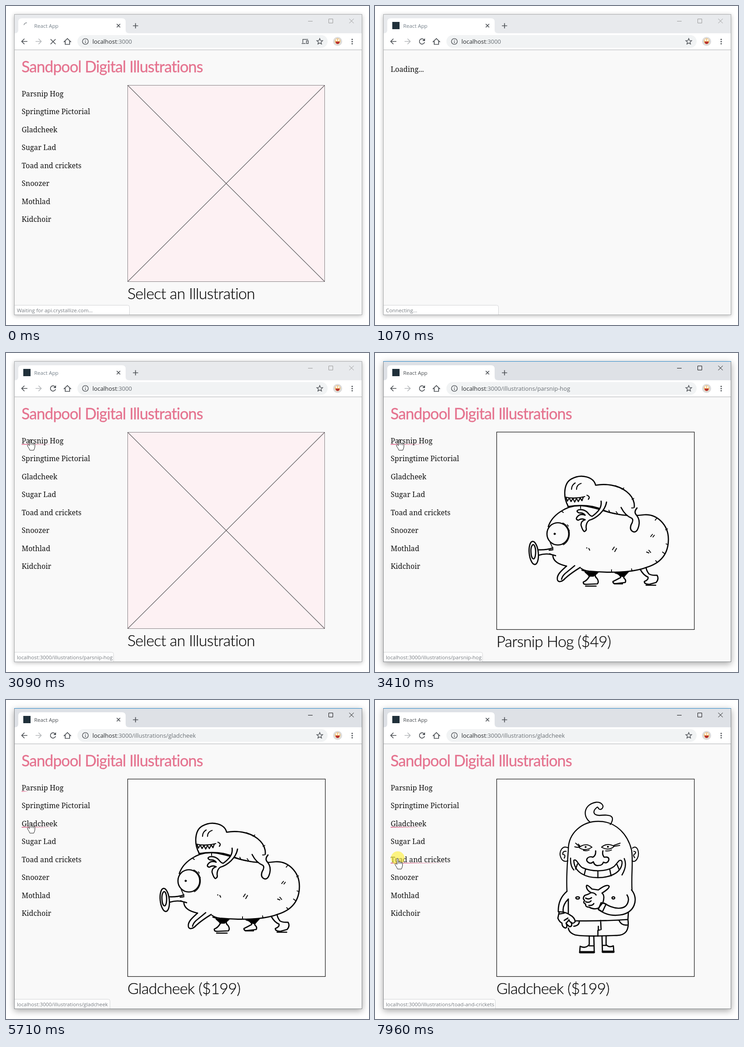
Write an HTML page that moves like this. It is 798 by 702 pixels and loops after 8 s.

```html
<!DOCTYPE html>
<html lang="en">
<head>
<meta charset="utf-8">
<title>Illustration shop</title>
<style>
html, body { margin: 0; width: 100%; height: 100%; overflow: hidden; background: #fff; }
#win { position: absolute; left: 18px; top: 18px; width: 765px; height: 662px; box-shadow: 0 2px 9px rgba(0,0,0,.27); }
#win.on { box-shadow: 0 4px 14px rgba(0,0,0,.36); }
svg { position: absolute; left: 0; top: 0; display: block; }
.ui { font-family: "Open Sans", "Noto Sans", sans-serif; }
.nav { font: 15.76px "Noto Serif", serif; fill: #111; }
.big { font-family: Lato, "Open Sans", sans-serif; font-size: 34px; }
.line { fill: none; stroke: #4d5156; stroke-width: 1.7; }
.ink { fill: none; stroke: #050505; stroke-width: 2.7; stroke-linecap: round; stroke-linejoin: round; }
</style>
</head>
<body>
<div id="win"></div>
<svg width="798" height="702" viewBox="0 0 798 702">
  <defs>
    <linearGradient id="fade"><stop stop-color="#db5f85"/><stop offset="1" stop-color="#db5f85" stop-opacity="0"/></linearGradient>
  </defs>
  <rect x="18" y="18" width="765" height="662" fill="#f9f9f9"/>
  <rect id="bar" x="18" y="18" width="765" height="42" fill="#e8eaed"/>
  <path d="M19 60C25 60 27 57 27 52V35Q27 27 35 27H255Q263 27 263 35V52C263 57 265 60 271 60Z" fill="#fff"/>
  <rect x="18" y="60" width="765" height="36" fill="#fff"/>
  <path d="M18 96.5H783" stroke="#b0b2b4"/>

  <path id="spin" class="line" d="M39.4 42A6 6 0 0 1 46 37" style="stroke:#8d9297;stroke-width:1.5"/>
  <rect id="fav" x="38" y="35" width="16" height="16" fill="#20303a"/>
  <path class="line" d="M243.5 39.5l7.5 7.5m0-7.5l-7.5 7.5M279 43.5h11.5M284.7 37.7v11.5"/>
  <g id="ctl" fill="none" stroke="#999">
    <path d="M664 33.5h10M709.5 28.5h9v9h-9zM754.5 28l10 10m0-10l-10 10"/>
  </g>

  <path class="line" d="M47 78H35M40.5 72L34.5 78L40.5 84"/>
  <path class="line" d="M65 78H77M71.5 72L77.5 78L71.5 84" style="stroke:#b6b9bc"/>
  <path id="stop" class="line" d="M98 73l11 11m0-11l-11 11"/>
  <g id="reload">
    <path class="line" d="M108 74.5A5.8 5.8 0 1 0 109 79.5"/>
    <path d="M110 71v6h-6z" fill="#4d5156"/>
  </g>
  <path class="line" d="M128 78.3L135 71.6L142 78.3H139.8V84.5H130.2V78.3Z"/>
  <rect x="157" y="64" width="550" height="28" rx="14" fill="#f1f3f4"/>
  <g class="ui">
    <text id="tab" x="62" y="47.5" font-size="11.4">React App</text>
    <text x="190" y="82.5" font-size="12.9" fill="#26292c">localhost<tspan fill="#6b7176">:3000</tspan><tspan id="path" fill="#6b7176"></tspan></text>
  </g>
  <g class="line" style="stroke-width:1.4">
    <circle cx="174.5" cy="78" r="6.4"/><path d="M174.5 77.5v4M174.5 74.5v1.5"/>
    <path d="M689.7 71.6l1.8 4.3 4.7.4-3.6 3 1.1 4.5-4-2.4-4 2.4 1.1-4.5-3.600-3 4.700-.4z"/>
    <path id="dev" d="M664 73.5H652.5V81M650 82.5H658.5M660.5 76.5H664.5V82.5H660.5Z"/>
  </g>
  <circle cx="729" cy="78" r="10" fill="#dddcdb"/>
  <circle cx="729" cy="77.5" r="6.3" fill="#f2c27b"/>
  <circle cx="726.5" cy="75" r="1.9" fill="#fff"/><circle cx="731.5" cy="75" r="1.9" fill="#fff"/>
  <path d="M724.5 78.5h9q-1 5-4.5 5t-4.5-5z" fill="#b3272d"/>
  <g fill="#4d5156"><circle cx="761" cy="73.5" r="1.5"/><circle cx="761" cy="78.2" r="1.5"/><circle cx="761" cy="83" r="1.5"/></g>

  <text id="load" class="nav" x="34.5" y="145">Loading...</text>
  <g id="page">
    <text class="big" x="34" y="146" fill="#e5738f" stroke="#e5738f" stroke-width=".35" letter-spacing="-.92">Sandpool Digital Illustrations</text>
    <g id="nav"></g>
    <g id="wire" stroke="#5d5a5d">
      <rect x="267.5" y="174.5" width="433" height="432" fill="#fdf1f3" stroke="#858084"/>
      <path d="M267.5 174.5L700.5 606.5M700.5 174.5L267.5 606.5" stroke-width="1.2"/>
    </g>
    <rect id="frame" x="267.5" y="174" width="434.5" height="434.5" fill="#fbfbfb" stroke="#111" stroke-width="1.2"/>

    <g id="pig" class="ink">
      <path d="M381 382C389 357 420 335 452 336C478 337 500 348 530 354C555 358 570 359 592 356C620 354 645 378 645 410C645 440 630 462 596 472C565 484 510 484 470 480C462 479 457 477 453 474M421 469C405 465 393 460 391 447"/>
      <ellipse cx="402" cy="398" rx="24" ry="24.5" fill="#fbfbfb"/>
      <path d="M413 374C432 383 432 412 414 422M385 417Q389 425 391 431M423 378l2 3M427 390v2" stroke-width="1.8"/>
      <circle cx="395" cy="398" r="2" fill="#000" stroke-width="1"/>
      <ellipse cx="349" cy="440" rx="10" ry="25.5" transform="rotate(-6 349 440)" fill="#fbfbfb"/>
      <path d="M345 424C350 416 354 430 353 442C352 458 344 456 343 440C342 432 344 426 345 424"/>
      <path d="M359 433Q376 434 391 429M360 445Q378 439 397 446M383 434l8-1M384 442l8 3"/>
      <path d="M421 469C409 480 399 488 401 499C403 506 412 503 418 496Q430 485 451 472M439 468L422 482Q412 489 410 498"/>
      <path d="M455 478Q468 480 471 492Q466 501 458 504Q457 510 466 509L489 508Q493 503 488 496Q480 490 489 483M528 484Q540 487 540 494Q531 499 523 503Q523 509 533 507L550 505Q553 500 547 495Q546 490 556 482"/>
      <path d="M462 482L490 483L480 491L472 491ZM532 483L557 481L547 492L540 491Z" fill="#000"/>
      <path d="M583 476Q590 489 600 493Q602 499 592 503Q592 509 603 509L618 505Q625 497 620 489Q608 490 602 486Q597 479 596 473M596 511h21M463 513h23M526 508h18"/>
      <path d="M470 430l2 4M465 429h1M522 433l4-6M527 437l4-7M597 438l5 2M602 434l4 5M606 404l4-5M611 405l3-4M639 389l4-2M640 420l4 2M632 438l4 3M617 457l4 4M410 348l4 3M452 342v-5M520 482v-5M565 480l-1-5M616 368l3-4" stroke-width="1.9"/>
      <path fill="#fbfbfb" d="M424 336C413 315 415 286 432 277C454 265 481 273 485 291C505 287 535 290 553 305C571 319 576 341 562 355Q554 360 526 353Q510 350 500 345Q470 331 424 338"/>
      <path d="M418 317Q439 322 461 316M420 318l3 8 4-7 4 8 4-7 4 8 4-8 4 7 4-8 4 6 3-8M466 313Q474 316 469 322M432 300Q432 291 440 286M443 300Q443 290 453 287" stroke-width="2.3"/>
      <path fill="#fbfbfb" d="M497 326C499 341 490 350 478 359Q474 360 468 352Q460 343 448 345Q440 348 449 352Q458 351 462 357Q452 353 446 359Q439 366 447 368Q454 363 462 367Q452 370 453 379Q456 390 460 393Q466 391 464 384Q464 373 471 368C486 364 506 348 509 328"/>
      <path fill="#fbfbfb" d="M541 340Q550 358 565 364Q569 368 563 378Q559 389 567 393Q576 397 580 380Q583 367 575 357Q568 350 576 341"/>
      <path d="M514 346l2 4M530 349l3 4M529 292l4 3M543 300l4-3M565 322l4-2M568 341h-4" stroke-width="1.8"/>
    </g>

    <g id="man" class="ink">
      <path d="M473 269C454 254 461 229 486 225C498 224 506 234 498 240C489 244 492 232 487 237C479 244 478 253 493 254C512 252 526 253 521 267Q520 271 517 274" stroke-width="2.3"/>
      <path d="M422 421C420 385 423 361 425 329C425 292 456 267 491 267C532 267 556 298 564 330C568 354 563 383 565 419" stroke-width="2.4"/>
      <path d="M424 325C411 319 404 335 408 345Q412 358 424 354M420 333Q412 332 413 340Q420 340 416 348M566 326C576 317 583 336 577 348Q572 358 565 354M569 333Q576 334 571 339Q566 341 571 347" stroke-width="2.1"/>
      <path d="M439 323Q448 326 454 321Q466 315 477 324Q461 334 449 325M441 315l9 8M447 317l4 5M498 324Q510 313 526 322Q514 333 498 324M526 322l12-2M525 320l14-5M458 331q8 2 13-1M507 332q8 1 13-2" stroke-width="2"/>
      <circle cx="463" cy="323.5" r="1.7" fill="#000" stroke-width="1"/><circle cx="512" cy="323" r="1.7" fill="#000" stroke-width="1"/>
      <path d="M485 332Q486 342 479 346C468 342 460 353 470 358Q475 361 480 356Q483 366 492 364Q500 364 502 357Q511 361 514 352Q515 344 504 346Q499 341 501 332"/>
      <path d="M437 353C443 348 447 364 456 369C479 379 510 378 526 366Q533 358 536 354Q544 350 543 360C540 384 510 391 490 391C462 391 438 379 437 353ZM445 361l-4 11M463 372l-3 13M490 376v15M516 372l3 15M532 362l5 12M430 348Q429 365 437 374M548 349Q555 365 543 385" stroke-width="2.5"/>
      <ellipse cx="445.5" cy="435.5" rx="4" ry="2.5"/><ellipse cx="524" cy="435.500" rx="3" ry="2.5"/>
      <path d="M422 421Q402 438 403 466M425 438Q411 452 414 467M425 438V469M564 418C581 438 570 470 539 473Q512 477 491 461M504 447C520 459 553 467 557 441Q558 435 554 429M557 468L556 483"/>
      <path fill="#fbfbfb" d="M491 418L477 416Q463 402 465 412Q466 419 475 424Q469 428 461 430Q455 437 461 441Q456 446 463 449Q462 456 471 456Q481 462 491 458L501 446Q506 430 499 425Q518 413 514 409Q508 405 491 418Z"/>
      <path d="M463 436q8 4 13-1M463 444q8 3 12-2M470 452q8 1 11-4M475 424q8 0 11 5M491 461l6-15 11 3-8 17z"/>
      <path fill="#fbfbfb" d="M405 466Q418 466 427 472Q440 479 440 488Q435 494 431 489Q435 498 428 499Q423 496 420 491Q424 500 419 502Q411 500 411 491Q405 488 402 480Z"/>
      <path d="M405 471l11-2M416 485l8-5M421 490l6-6M430 489l-5-5"/>
      <path d="M440 486Q500 487 556 483Q561 519 530 518Q460 521 440 517Q426 512 425 502M496 485L497 505L490 507V520M491 498v8M437 498Q449 496 449 488M537 486Q542 497 556 495"/>
      <path d="M471 519V538Q463 548 451 542L450 555L482 555L481 519M499 519L500 555H525L524 541Q514 546 508 538V519M471 541h10M500 540h8"/>
      <path d="M451 555H481M501 554H524" stroke-width="5"/>
    </g>
    <text id="cap" class="big" x="267" font-weight="300" fill="#050505" stroke="#050505" stroke-width=".25" letter-spacing="-.7"></text>
  </g>

  <g id="status" class="ui">
    <path id="pill" fill="#fff" stroke="#d3d4d6"/>
    <text id="msg" x="24" y="673.5" font-size="11.35" fill="#777c81"></text>
  </g>
  <rect id="edge" x="18.5" y="18.5" width="764" height="661" fill="none"/>
  <path id="top" d="M18 18.5H783" stroke="#2b88c9"/>

  <g id="cursor">
    <circle id="ring" r="15" fill="#fdee30" fill-opacity=".6"/>
    <path id="arrow" d="M0 0V16L3.700 12.500L6.300 18.500L9 17.300L6.400 11.500H11.300Z" fill="#fff" stroke="#222"/>
    <path id="hand" d="M-1.5 1.5Q0-.8 1.5 1.5V8Q3.5 6.5 4.6 8.6Q6.6 7.3 7.6 9.4Q10 8.5 10.5 11V16Q10 20 8 24H-.5Q-2 20-5.5 15Q-7 12-4.5 11.5Q-3 12-1.5 14Z M1.5 8V12M4.6 8.6V12.5M7.6 9.4V13" fill="#fff" stroke="#222"/>
  </g>
</svg>
<script>
const $ = id => document.getElementById(id);
const show = (id, on) => { $(id).style.display = on ? '' : 'none'; };
const LOOP = 8000, ROW = 39.43;
const at = (table, t) => table.filter(r => r[0] <= t).pop();

const names = ['Parsnip Hog', 'Springtime Pictorial', 'Gladcheek', 'Sugar Lad',
  'Toad and crickets', 'Snoozer', 'Mothlad', 'Kidchoir'];
const slug = i => '/illustrations/' + names[i].toLowerCase().replace(/ /g, '-');
const host = 'localhost:3000';

// time, text, bubble edge
const statuses = [
  [0, 'Waiting for api.crystallize.com...', 271.5],
  [430, 'Connecting...', 271.5],
  [1240, '', 0],
  [2860, host + slug(0), 236.5],
  [4330, host + slug(1).slice(0, 33) + '...', 271.5],
  [4800, host + slug(2), 228.5],
  [7130, host + slug(3), 228.5],
  [7350, host + slug(4), 264.5]
];
// time, path, caption
const routes = [
  [0, '', 'Select an Illustration'],
  [3240, slug(0), names[0] + ' ($49)'],
  [5640, slug(2), names[2] + ' ($199)']
];
const views = [[0, 'wire'], [430, 'load'], [1170, 'wire'], [3310, 'pig'], [5870, 'man']];
// row, grow start, shrink start, shrink time constant
const lines = [[0, 2860, 5640, 40], [1, 4330, 4500, 130], [2, 4760, 9e3, 1], [3, 7130, 7350, 60], [4, 7350, 9e3, 1]];
const clicks = [[3160, 3320], [5640, 5695], [7960, 8000]];
const moves = [
  [2700, 5, 232], [2855, 40, 204], [3010, 53, 190], [4180, 53, 190], [4330, 54, 224],
  [4555, 53, 247], [4705, 53, 258], [4930, 53, 269], [6720, 53, 269], [6954, 50, 298],
  [7188, 49, 322], [7344, 49, 340], [7500, 50, 348], [8000, 50, 348]
];
// start, end, number of pictures
const bursts = [[2700, 3470, 11], [4180, 4930, 11], [6720, 7500, 11]];

const rows = names.map((name, i) => {
  const make = (tag, attrs) => {
    const el = document.createElementNS('http://www.w3.org/2000/svg', tag);
    for (const k in attrs) el.setAttribute(k, attrs[k]);
    return $('nav').appendChild(el);
  };
  const text = make('text', { class: 'nav', x: 34.5, y: 199 + i * ROW });
  text.textContent = name;
  const rule = make('rect', { x: 34.5, y: 200.3 + i * ROW, height: 1.7, width: 0, fill: 'url(#fade)' });
  return { text, rule };
});

function stepped(t) {
  const b = at(bursts, t + 15);
  if (!b) return t;
  const d = (b[1] - b[0]) / (b[2] - 1);
  return b[0] + d * Math.min(b[2] - 1, Math.floor((t + 15 - b[0]) / d));
}

function pointer(t) {
  const i = Math.max(1, moves.findIndex(m => m[0] > t));
  const a = moves[i - 1], b = moves[i], k = (t - a[0]) / (b[0] - a[0]);
  return [a[1] + (b[1] - a[1]) * k, a[2] + (b[2] - a[2]) * k];
}

function drawChrome(t) {
  const busy = t < 1000, focus = t >= 3160;
  show('spin', busy); show('stop', busy);
  show('fav', !busy); show('reload', !busy);
  show('dev', t < 430); show('top', focus);
  $('spin').setAttribute('transform', `rotate(${-Math.floor(t / 75) * 30} 45 43)`);
  $('win').className = focus ? 'on' : '';
  $('bar').setAttribute('fill', focus ? '#dee1e6' : '#e8eaed');
  $('tab').setAttribute('fill', focus ? '#4c5054' : '#75808a');
  $('ctl').setAttribute('stroke', focus ? '#111' : '#999');
  $('edge').setAttribute('stroke', focus ? '#84878a' : '#a9abad');
}

function drawPage(t) {
  const view = at(views, t)[1], [, path, caption] = at(routes, t);
  show('load', view === 'load'); show('page', view !== 'load');
  show('wire', view === 'wire'); show('frame', view !== 'wire');
  show('pig', view === 'pig'); show('man', view === 'man');
  $('path').textContent = path;
  $('cap').textContent = caption;
  $('cap').setAttribute('y', view === 'wire' ? 645 : 647);
  for (const [i, on, off, tau] of lines) {
    let k = t < on ? 0 : 1 - Math.exp(-(t - on) / 150);
    if (t > off) k *= Math.exp(-(t - off) / tau);
    const { text, rule } = rows[i];
    rule.setAttribute('width', k * text.getComputedTextLength());
  }
  const [, msg, right] = at(statuses, t);
  show('status', msg);
  $('msg').textContent = msg;
  $('pill').setAttribute('d', `M18 658.5H${right - 4}Q${right} 658.5 ${right} 662.5V680H18Z`);
}

function drawCursor(t) {
  show('cursor', t >= 2700);
  if (t < 2700) return;
  const [x, y] = pointer(stepped(t));
  const over = x > 33 && names.some((n, i) => Math.abs(y - 193 - i * ROW) < 11);
  show('hand', over); show('arrow', !over);
  show('ring', clicks.some(c => t >= c[0] && t < c[1]));
  $('cursor').setAttribute('transform', `translate(${x} ${y})`);
}

const start = performance.now();
function tick() {
  const t = (performance.now() - start) % LOOP;
  drawChrome(t);
  drawPage(t);
  drawCursor(t);
  requestAnimationFrame(tick);
}
tick();
</script>
</body>
</html>
```
